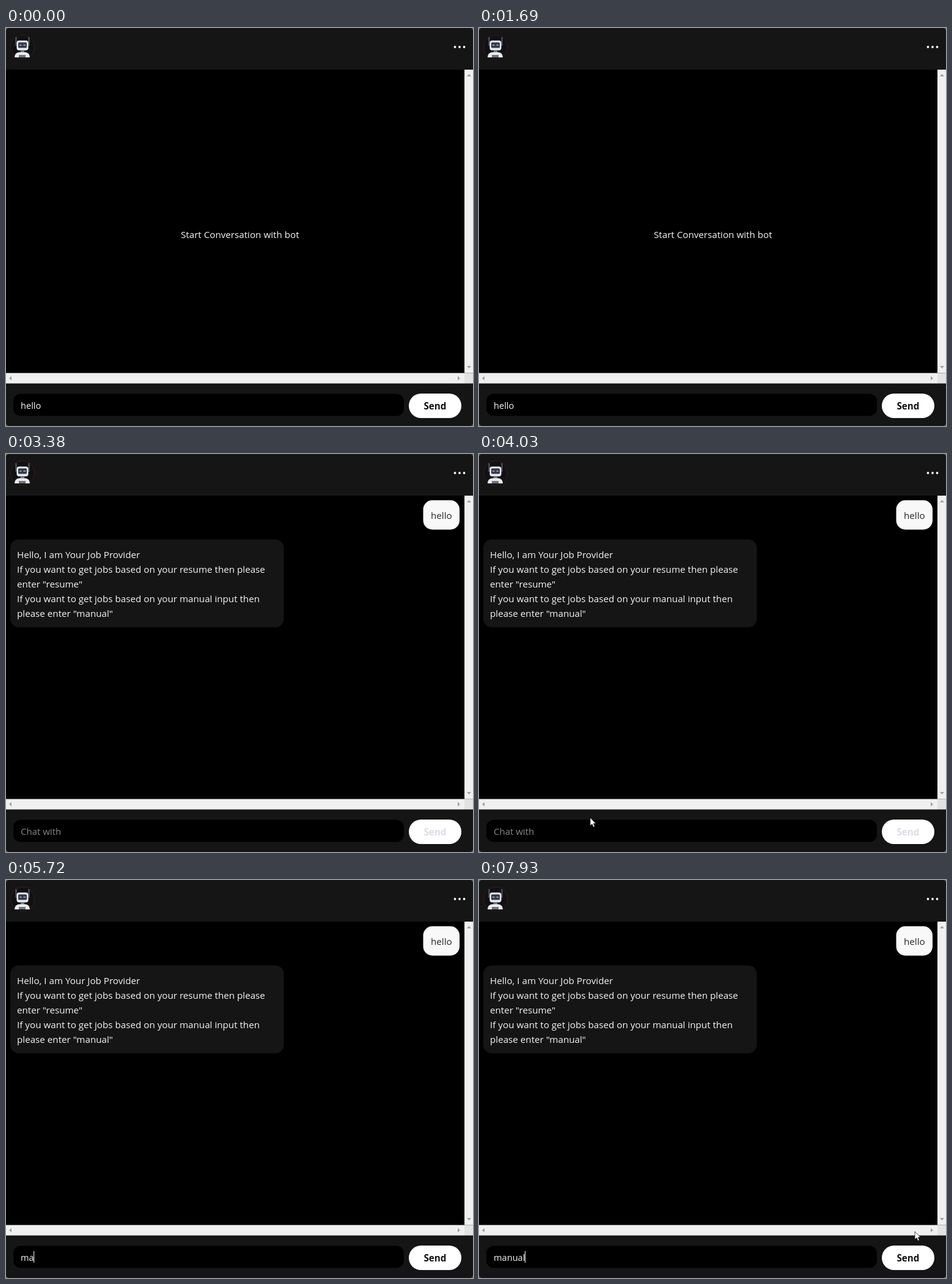
An HTML page that plays this animation: 764 by 650 pixels, repeating every 8000 ms.

```html
<!DOCTYPE html>
<html lang="en">
<head>
<meta charset="utf-8">
<title>Chat bot</title>
<style>
  html, body { margin: 0; width: 100%; height: 100%; overflow: hidden; background: #5c5c5c; }
  svg { display: block; width: 764px; height: 650px; }
  text { font: 15.2px "Open Sans", "Noto Sans", sans-serif; fill: #f6f6f6; white-space: pre; }
  .panel { fill: #151515; }
  .bar { fill: #f0f0f1; }
  .arrow { fill: #a0a0a0; }
  .light { fill: #f8f8f8; }
  #send { font-weight: 700; }
  #hint { fill: #868686; font-size: 15px; }
  #entry { font-size: 14.6px; }
</style>
</head>
<body>
<svg viewBox="0 0 764 650" xmlns="http://www.w3.org/2000/svg">
  <rect class="panel" width="764" height="650" rx="5"/>
  <rect y="68" width="750" height="495"/>

  <!-- avatar -->
  <circle cx="27" cy="31" r="19.5" fill="#111113" stroke="#3a1a24"/>
  <path d="M16.5 15v14M37.5 15v14" stroke="#565c66" stroke-width="2"/>
  <rect x="17.5" y="20.5" width="19" height="16" rx="4" fill="#e8ebef"/>
  <rect x="20" y="23.5" width="14" height="9" rx="1.5" fill="#353948"/>
  <path d="M22 28h3.5M28.5 28h3.5" stroke="#8e96b0" stroke-width="2"/>
  <rect x="24" y="36.5" width="6" height="4" fill="#70767c"/>
  <path d="M14 48q0-8 8-8.5h9q8 .5 8 8.5z" fill="#e8ebef"/>
  <rect x="21" y="44" width="11" height="4" fill="#6b767c"/>

  <g class="light">
    <circle cx="734.5" cy="31" r="1.9"/><circle cx="742" cy="31" r="1.9"/><circle cx="749.5" cy="31" r="1.9"/>
  </g>

  <!-- scroll bars -->
  <path class="bar" d="M750 68h14v495.5h-14zM0 563.5h750v17h-750z"/>
  <rect x="750" y="563.5" width="14" height="17" fill="#e2e2e2"/>
  <path class="arrow" d="M754 79l3.5-4 3.500 4zM754 552l3.500 4 3.500-4zM9 568.500l-4 3.500 4 3.500zM739 568.500l4 3.500-4 3.500z"/>

  <text id="intro" x="286" y="342.5">Start Conversation with bot</text>

  <g id="sent">
    <rect class="light" x="682.5" y="75.5" width="59.5" height="48" rx="15"/>
    <text x="695" y="106" style="fill:#262626">hello</text>
  </g>
  <g id="waiting">
    <rect class="panel" x="7" y="138.5" width="55.5" height="25" rx="12.5"/>
    <g class="light"><circle cx="18.5" cy="150.5" r="4"/><circle cx="34.5" cy="150.5" r="4"/><circle cx="50.5" cy="150.5" r="4"/></g>
  </g>
  <g id="reply">
    <rect class="panel" x="7" y="139.5" width="447.5" height="143.5" rx="14"/>
    <text>
      <tspan x="18" y="170">Hello, I am Your Job Provider</tspan>
      <tspan x="18" y="194">If you want to get jobs based on your resume then please</tspan>
      <tspan x="18" y="218">enter "resume"</tspan>
      <tspan x="18" y="242">If you want to get jobs based on your manual input then</tspan>
      <tspan x="18" y="266">please enter "manual"</tspan>
    </text>
  </g>

  <!-- message form -->
  <rect x="12" y="597.5" width="639" height="36" rx="12"/>
  <text id="hint" x="24" y="622">Chat with</text>
  <text id="entry" x="24" y="622"></text>
  <rect id="caret" y="606" width="1" height="19" fill="#fff"/>
  <rect x="659" y="597" width="86" height="40" rx="20" fill="#fff"/>
  <text id="send" x="683.5" y="623">Send</text>

  <path id="pointer" d="M0 0v13l3-2.6 2.2 4.8 2.2-1-2.2-4.6h4z" fill="#fff" stroke="#111" stroke-width=".7"/>
  <path id="hand" d="M-1.5 1q1.5-2 3 0v6q1.500-1.200 2.700.2 1.500-.8 2.500.5 2-.6 2.300 1.500v4q-.5 2-2 4.300h-6.500q-1.500-3-4.500-6-.8-2 .8-1.800l1.700 1.400z" fill="#fff" stroke="#444"/>
</svg>
<script>
  const LOOP = 8000, STEP = 130;
  const SENT = 2600, REPLIED = 3250, FOCUSED = 4420, BLINK = 530;
  const word = 'manual';
  const keys = [5460, 5590, 5850, 6110, 6500, 6760];
  // mouse strokes: it moves from start to stop, then rests until gone
  const strokes = [
    { start: 1950, stop: 2470, gone: 3250, from: [540, 500], to: [702, 609] },
    { start: 3640, stop: 4030, gone: 4160, from: [420, 500], to: [182, 594] },
    { start: 7410, stop: 7930, gone: LOOP, from: [440, 588], to: [713, 574] }
  ];
  const ease = p => 1 - (1 - p) ** 2;
  const el = id => document.getElementById(id);
  const show = (id, on) => el(id).style.display = on ? '' : 'none';

  function mouseAt(t) {
    const s = strokes.find(s => t >= s.start && t < s.gone);
    if (!s) return null;
    const p = ease(Math.min(1, (t - s.start) / (s.stop - s.start)));
    return s.from.map((v, i) => v + (s.to[i] - v) * p);
  }

  function draw(t) {
    const typed = keys.filter(k => k <= t).length;
    const value = t < SENT ? 'hello' : word.slice(0, typed);
    const entry = el('entry');
    entry.textContent = value;

    show('intro', t < SENT);
    show('sent', t >= SENT);
    show('waiting', t >= SENT && t < REPLIED);
    show('reply', t >= REPLIED);
    show('hint', !value);
    el('send').style.fill = value ? '#111' : '#dcdce6';

    const since = t - (typed ? keys[typed - 1] : FOCUSED);
    show('caret', t >= FOCUSED && since % (2 * BLINK) < BLINK);
    el('caret').setAttribute('x', 23.5 + (value ? entry.getComputedTextLength() : 0));

    const at = mouseAt(t);
    const onButton = at && at[0] > 659 && at[1] > 597;
    show('pointer', at && !onButton);
    show('hand', onButton);
    if (at) el(onButton ? 'hand' : 'pointer').setAttribute('transform', `translate(${at})`);
  }

  const began = performance.now();
  function tick() {
    const t = (performance.now() - began) % LOOP;
    draw(Math.floor(t / STEP) * STEP);
    requestAnimationFrame(tick);
  }
  tick();
</script>
</body>
</html>
```
